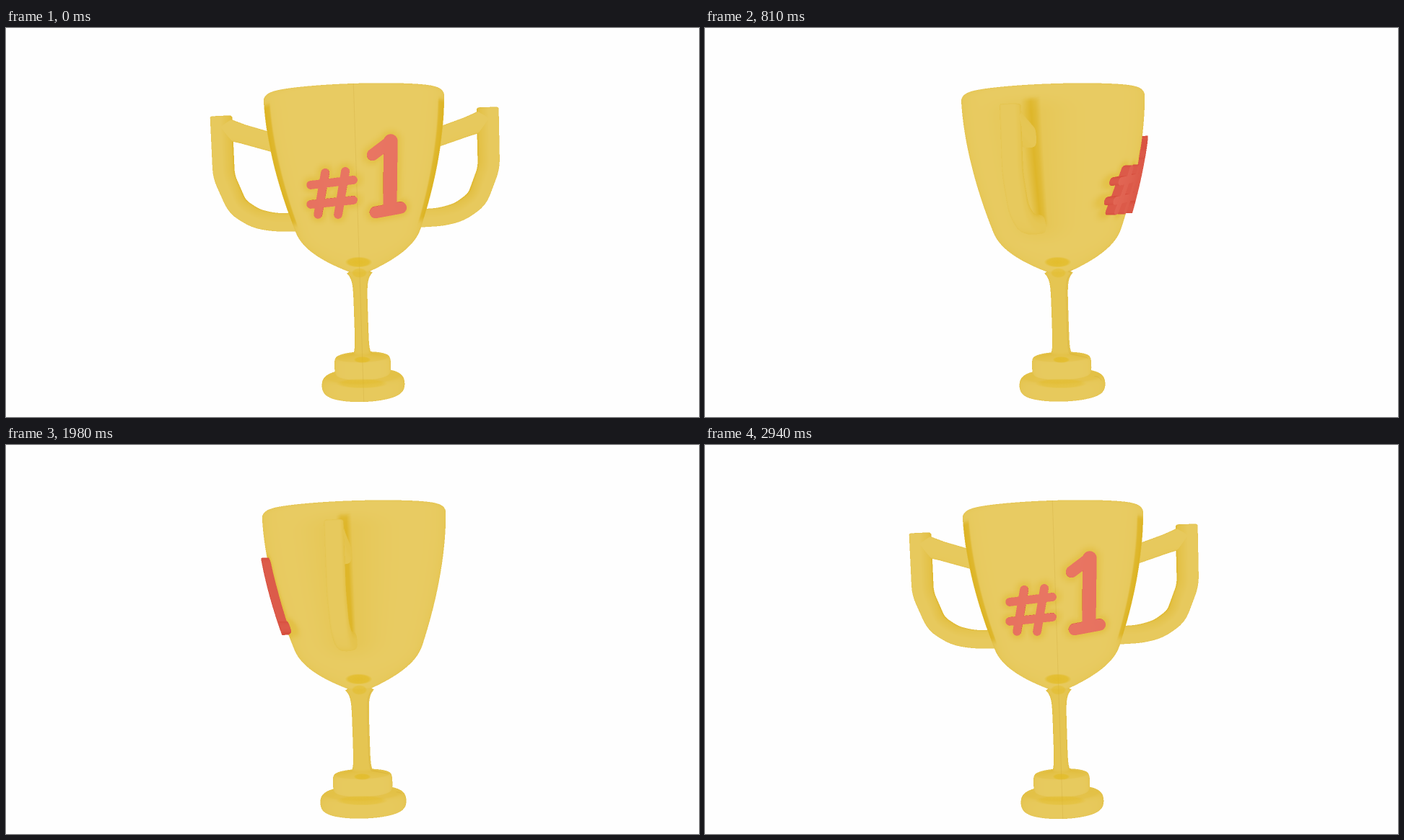
Write an HTML page with a canvas that moves like this. It is 960x540 px and loops after 2.97 s.

```html
<!DOCTYPE html>
<html lang="en">
<head>
<meta charset="utf-8">
<title>Trophy</title>
<style>
html, body { margin: 0; width: 100%; height: 100%; overflow: hidden; background: #fefefe; }
canvas { display: block; }
</style>
</head>
<body>
<canvas id="stage" width="960" height="540"></canvas>
<script>
const ctx = document.getElementById('stage').getContext('2d');
const LOOP = 2970, STEP = 30, HALF = 1470;

// View: axis position, horizon, camera distance and roll
const AXIS = 485.3, HORIZON = 200, DIST = 1333, ROLL = 0.0327;
// Render window, at double resolution
const LEFT = 270, TOP = 68, SCALE = 2, W = 430 * SCALE, H = 460 * SCALE;
const DEG = Math.PI / 180, BULGE = 2.2;

const clamp = (v, a = 0, b = 1) => Math.min(b, Math.max(a, v));
const lerp = (a, b, t) => a + (b - a) * t;
const smooth = (a, b, v) => { const t = clamp((v - a) / (b - a)); return t * t * (3 - 2 * t); };
const wrap = a => a - 2 * Math.PI * Math.round(a / (2 * Math.PI));
const signPow = (v, e) => Math.sign(v) * Math.abs(v) ** e;

// Turned body: rim, bowl, stem and two discs as [radius, height]
const bowl = y => 124.5 - 14 * (Math.max(0, y - 95) / 105) ** 1.76
  - 53 * (Math.max(0, y - 280) / 60) ** 2.2;
const stem = y => 9.6 + 8 * Math.exp((340 - y) / 8) + 5 * Math.exp((y - 455) / 6);

const profile = [];
for (let f = 0; f < 90; f += 15) {
  profile.push([112 + 12.5 * Math.sin(f * DEG), 98 - 10.5 * Math.cos(f * DEG)]);
}
for (let y = 98; y < 340; y += 3) profile.push([bowl(y), y]);
for (let y = 340; y < 456; y += 4) profile.push([stem(y), y]);
function addDisc(r, curve, mid, half, power) {
  for (let f = -90; f <= 90; f += 12) {
    profile.push([
      r - curve + curve * Math.cos(f * DEG) ** power,
      mid + half * signPow(Math.sin(f * DEG), power)
    ]);
  }
}
addDisc(39, 6, 468.5, 12.5, 0.6);
addDisc(57.3, 11, 494.5, 12.5, 0.85);

// Mesh storage
const CUP = 0, GOLD = 1, FACE = 2, WALL = 3;
const verts = [], tris = [];

function grid(rows, cols, closed, kind, point) {
  const base = verts.length, n = closed ? cols : cols + 1;
  for (let i = 0; i <= rows; i++) {
    for (let j = 0; j < n; j++) {
      const [x, y, z, w = 0] = point(i, j);
      verts.push({ x, y, z, w, kind, nx: 0, ny: 0, nz: 0 });
    }
  }
  const at = (i, j) => base + i * n + j % n;
  for (let i = 0; i < rows; i++) {
    for (let j = 0; j < cols; j++) {
      addTri(at(i, j), at(i, j + 1), at(i + 1, j));
      addTri(at(i, j + 1), at(i + 1, j + 1), at(i + 1, j));
    }
  }
}

function addTri(i, j, k) {
  const a = verts[i], b = verts[j], c = verts[k];
  const ux = b.x - a.x, uy = b.y - a.y, uz = b.z - a.z;
  const vx = c.x - a.x, vy = c.y - a.y, vz = c.z - a.z;
  for (const p of [a, b, c]) {
    p.nx += uy * vz - uz * vy;
    p.ny += uz * vx - ux * vz;
    p.nz += ux * vy - uy * vx;
  }
  tris.push(i, j, k);
}

// Lettering lies on a surface flatter than the cup
const RAISE = 10, THICK = 12, BEND = 150;
const letterZ = (x, y) => bowl(y) + RAISE - x * x / (2 * BEND);

// Stage point at rest -> position on the lettering
function unproject(px, py) {
  const v0 = py - HORIZON + (px - AXIS) * ROLL, u0 = px - AXIS - v0 * ROLL;
  let x = u0, y = HORIZON + v0;
  for (let i = 0; i < 3; i++) {
    const s = DIST / (DIST - letterZ(x, y));
    x = u0 / s;
    y = HORIZON + v0 / s;
  }
  return [x, y];
}

// Round strokes: ends and half width
const strokes = [];
function addStroke(x1, y1, x2, y2, w) {
  strokes.push([...unproject(x1, y1), ...unproject(x2, y2), w]);
}
for (let k = 0; k < 2; k++) {
  addStroke(442 + 28 * k, 201 - 2 * k, 432 + 28 * k, 259, 5.4);
  addStroke(422, 218 + 27 * k, 481, 211 + 28 * k, 5.4);
}
addStroke(533, 157, 532, 250, 8.8);
addStroke(508, 176, 533, 157, 7.4);
addStroke(512, 256, 547, 249.5, 7.6);

function letterShade(x, y) {
  let best = 99;
  for (const [x1, y1, x2, y2, w] of strokes) {
    const dx = x2 - x1, dy = y2 - y1;
    const t = clamp(((x - x1) * dx + (y - y1) * dy) / (dx * dx + dy * dy));
    best = Math.min(best, Math.hypot(x - x1 - dx * t, y - y1 - dy * t) - w);
  }
  return 0.4 * Math.exp(-((Math.max(0, best) / 6) ** 2));
}

function bodyShade(x, y, a) {
  if (y > 482) return 0.1;
  if (y > 455) return 0.06;
  if (y > 335) return 0.26;
  const side = (Math.abs(a) - Math.PI / 2) / 0.35;
  const near = smooth(95, 125, y) * (1 - smooth(265, 300, y));
  return 0.22 * Math.exp(-side * side) * near + (Math.cos(a) > 0 ? letterShade(x, y) : 0);
}

const COLS = 120;
grid(profile.length - 1, COLS, true, CUP, (i, j) => {
  const [r, y] = profile[i], a = wrap(j / COLS * 2 * Math.PI), x = r * Math.sin(a);
  return [x, y, (r + BULGE) * Math.cos(a), bodyShade(x, y, a)];
});

// Polyline with its corners rounded off
function roundCorners(pts, cut) {
  const out = [pts[0]];
  for (let i = 1; i < pts.length - 1; i++) {
    const p = pts[i];
    const [a, b] = [pts[i - 1], pts[i + 1]].map(q => {
      const t = cut / Math.hypot(q[0] - p[0], q[1] - p[1]);
      return [lerp(p[0], q[0], t), lerp(p[1], q[1], t)];
    });
    for (let t = 0; t <= 1; t += 0.25) {
      out.push([0, 1].map(k => lerp(lerp(a[k], p[k], t), lerp(p[k], b[k], t), t)));
    }
  }
  out.push(pts[pts.length - 1]);
  return out;
}

// Capped tube in the handle plane, tapering from half width w0 to w1
function tube(keys, side, w0, w1, thick) {
  const path = roundCorners(keys, 11), n = 24, last = path.length - 1;
  grid(last + 2, n, true, GOLD, (i, j) => {
    const k = Math.max(0, i - 2), [x, y] = path[k];
    const p = path[Math.max(0, k - 1)], q = path[Math.min(last, k + 1)];
    const dx = q[0] - p[0], dy = q[1] - p[1], len = Math.hypot(dx, dy);
    const size = Math.min(1, i * 0.92), lift = i < 2 ? 1.5 : 0;
    const f = j / n * 2 * Math.PI, c = signPow(Math.cos(f), 0.6) * size;
    const ox = dy / len * c, oy = -dx / len * c, w = lerp(w0, w1, k / last);
    const inner = clamp(-ox * 0.9 + (y > 220 ? -oy : oy) * 0.4);
    return [
      side * (x + ox * w - dx / len * lift), y + oy * w - dy / len * lift,
      signPow(Math.sin(f), 0.6) * thick * size, 0.08 + 0.45 * inner
    ];
  });
}

for (const side of [-1, 1]) {
  tube([[184.5, 118], [183.5, 200], [166, 243], [141, 260], [115, 266], [84, 267]], side, 15, 12.5, 11);
  tube([[184, 132], [165, 139], [112, 156]], side, 15, 13, 11);
}

function extrude([x1, y1, x2, y2, w]) {
  const len = Math.hypot(x2 - x1, y2 - y1), tx = (x2 - x1) / len, ty = (y2 - y1) / len;
  const cap = 8, mid = 6, count = 2 * cap + mid;
  // Distance along the stroke and half extent across it
  const row = i => {
    if (i >= cap && i <= cap + mid) return [len * (i - cap) / mid, w];
    const f = (i < cap ? i : count - i) / cap * Math.PI / 2, out = w * Math.cos(f);
    return [i < cap ? -out : len + out, w * Math.sin(f)];
  };
  const place = (i, across, depth) => {
    const [t, half] = row(i), o = across * half;
    const x = x1 + tx * t - ty * o, y = y1 + ty * t + tx * o;
    return [x, y, letterZ(x, y) - depth];
  };
  grid(count, 4, false, FACE, (i, j) => place(i, j / 2 - 1, 0));
  for (const e of [-1, 1]) grid(count, 1, false, WALL, (i, j) => place(i, e, j * THICK));
}
strokes.forEach(extrude);

for (const v of verts) {
  const len = Math.hypot(v.nx, v.ny, v.nz) || 1;
  v.nx /= len;
  v.nz /= len;
  v.a = Math.atan2(v.x, v.z);
}

// Colour ramps: gold 0-255, red 256-511
const ramp = new Uint32Array(512);
function fillRamp(from, light, dark) {
  for (let i = 0; i < 256; i++) {
    const [r, g, b] = light.map((v, k) => Math.round(lerp(v, dark[k], i / 255)));
    ramp[from + i] = (255 << 24 | b << 16 | g << 8 | r) >>> 0;
  }
}
fillRamp(0, [232, 203, 98], [221, 180, 36]);
fillRamp(256, [233, 118, 99], [212, 73, 57]);

const buffer = document.createElement('canvas');
buffer.width = W;
buffer.height = H;
const bctx = buffer.getContext('2d');
const image = bctx.createImageData(W, H);
const pixels = new Uint32Array(image.data.buffer);
const depth = new Float32Array(W * H);
const [sx, sy, sd, sc] = Array.from({ length: 4 }, () => new Float32Array(verts.length));

function project(x, y, z) {
  const s = DIST / (DIST - z), u = x * s, v = (y - HORIZON) * s;
  return [AXIS + u + v * ROLL, HORIZON + v - u * ROLL, s];
}

function shade(v, nz, turn, mirrors) {
  const edge = 1 - Math.abs(nz);
  if (v.kind === FACE) return 256 + 255 * clamp(edge * 0.9);
  if (v.kind === WALL) return 256 + 255 * clamp(0.6 + 0.35 * edge);
  let w = v.w + 0.4 * edge ** 3;
  if (v.kind === CUP && v.y > 100 && v.y < 280) {
    const a = wrap(v.a + turn);
    const span = smooth(102, 110, v.y) * (1 - smooth(262, 274, v.y));
    for (const [pos, half] of mirrors) {
      w += 0.7 * span * (1 - smooth(half - 1.5 * DEG, half + 1.5 * DEG, Math.abs(a - pos)));
    }
  }
  return 255 * clamp(w);
}

function fillTri(i, j, k) {
  const ax = sx[i], ay = sy[i], bx = sx[j] - ax, by = sy[j] - ay, cx = sx[k] - ax, cy = sy[k] - ay;
  const area = bx * cy - cx * by;
  if (Math.abs(area) < 1e-6) return;
  const x0 = Math.max(0, Math.ceil(ax + Math.min(0, bx, cx) - 0.5));
  const x1 = Math.min(W - 1, Math.floor(ax + Math.max(0, bx, cx) - 0.5));
  const y0 = Math.max(0, Math.ceil(ay + Math.min(0, by, cy) - 0.5));
  const y1 = Math.min(H - 1, Math.floor(ay + Math.max(0, by, cy) - 0.5));
  const d0 = sd[i], db = sd[j] - d0, dc = sd[k] - d0;
  const c0 = sc[i], cb = sc[j] - c0, cc = sc[k] - c0;
  for (let y = y0; y <= y1; y++) {
    const py = y + 0.5 - ay;
    for (let x = x0; x <= x1; x++) {
      const px = x + 0.5 - ax;
      const p = (px * cy - cx * py) / area, q = (bx * py - px * by) / area;
      if (p < -1e-5 || q < -1e-5 || p + q > 1.00001) continue;
      const d = d0 + p * db + q * dc, at = y * W + x;
      if (d > depth[at]) {
        depth[at] = d;
        pixels[at] = ramp[c0 + p * cb + q * cc | 0];
      }
    }
  }
}

function renderMesh(turn) {
  const cos = Math.cos(turn), sin = Math.sin(turn);
  // The cup mirrors each handle as a dark streak
  const mirrors = [];
  for (const home of [-90, 90]) {
    const f = wrap(home * DEG + turn);
    if (Math.abs(f) < 112 * DEG) mirrors.push([0.8 * f, (3.2 + 5 * Math.sin(f) ** 4) * DEG]);
  }
  pixels.fill(0);
  depth.fill(0);
  verts.forEach((v, i) => {
    const [x, y, s] = project(v.x * cos + v.z * sin, v.y, v.z * cos - v.x * sin);
    sx[i] = (x - LEFT) * SCALE;
    sy[i] = (y - TOP) * SCALE;
    sd[i] = s;
    sc[i] = shade(v, v.nz * cos - v.nx * sin, turn, mirrors);
  });
  for (let i = 0; i < tris.length; i += 3) fillTri(tris[i], tris[i + 1], tris[i + 2]);
  bctx.putImageData(image, 0, 0);
}

function drawSeam(angle) {
  if (Math.cos(angle) < 0.05) return;
  ctx.beginPath();
  let open = false;
  for (const [r, y] of profile) {
    const [x, py, s] = project(r * Math.sin(angle), y, (r + BULGE) * Math.cos(angle));
    const at = Math.round((py - TOP) * SCALE) * W + Math.round((x - LEFT) * SCALE);
    const seen = s > depth[at] - 0.004;
    if (seen && open) ctx.lineTo(x, py);
    else if (seen) ctx.moveTo(x, py);
    open = seen;
  }
  ctx.strokeStyle = 'rgba(176,136,30,0.2)';
  ctx.lineWidth = 0.8;
  ctx.stroke();
}

// Soft reflections that stay put while the body turns
function spot(x, y, rx, ry, alpha) {
  ctx.save();
  ctx.translate(x, y);
  ctx.scale(rx, ry);
  const g = ctx.createRadialGradient(0, 0, 0, 0, 0, 1);
  g.addColorStop(0, `rgba(226,186,32,${alpha})`);
  g.addColorStop(0.75, `rgba(226,186,32,${alpha * 0.85})`);
  g.addColorStop(1, 'rgba(226,186,32,0)');
  ctx.fillStyle = g;
  ctx.fillRect(-1, -1, 2, 2);
  ctx.restore();
}

// Half a turn easing in, the other half mirrored
function turnAt(ms) {
  const ease = u => Math.PI * (3 * u * u - 2 * u ** 3 + 1.22 * (u ** 3 - u * u));
  return ms <= HALF ? ease(ms / HALF) : 2 * Math.PI - ease((2 * HALF - ms) / HALF);
}

function draw(ms) {
  const turn = turnAt(ms);
  renderMesh(turn);
  ctx.fillStyle = '#fefefe';
  ctx.fillRect(0, 0, 960, 540);
  ctx.drawImage(buffer, LEFT, TOP, W / SCALE, H / SCALE);
  drawSeam(turn);
  drawSeam(turn + Math.PI);
  spot(488.5, 325, 19, 7.5, 0.8);
  spot(489.5, 340, 11, 7, 0.5);
  spot(493.5, 460.5, 12, 4.5, 0.7);
  spot(493, 493.5, 36, 7, 0.45);
}

let shown = -1;
function tick() {
  const ms = Math.floor(performance.now() % LOOP / STEP) * STEP;
  if (ms !== shown) {
    shown = ms;
    draw(ms);
  }
  requestAnimationFrame(tick);
}
tick();
</script>
</body>
</html>
```
